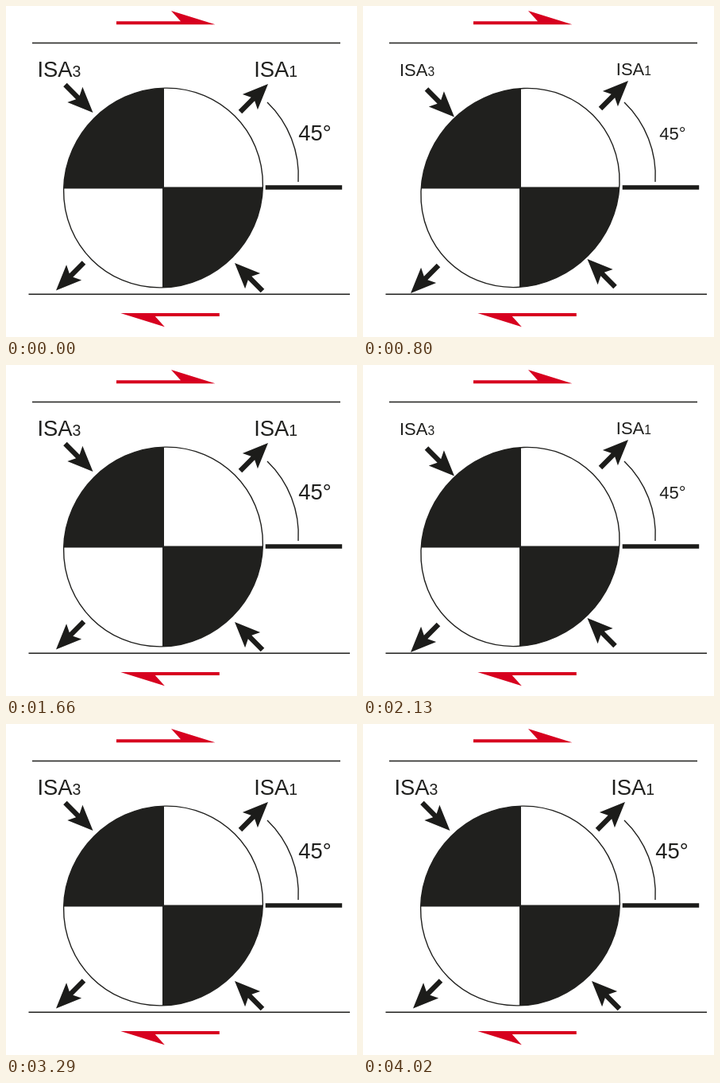
Write an HTML page that moves like this. It is 442 by 416 pixels and loops after 4080 ms.

```html
<!DOCTYPE html>
<html lang="en">
<head>
<meta charset="utf-8">
<title>Instantaneous stretching axes</title>
<style>
  html, body { margin: 0; width: 100%; height: 100%; overflow: hidden; background: #fff; }
  svg { display: block; }
  text { font-family: "Liberation Sans", Arial, sans-serif; fill: #20201e; }
  .line { fill: none; stroke: #20201e; stroke-width: 1.4; }
  .axis { stroke: #20201e; stroke-width: 2; }
</style>
</head>
<body>
<svg width="442" height="416" viewBox="0 0 442 416">
  <defs>
    <path id="shear" fill="#d7001f" d="M139 19.2H220L208 6L263.5 23.2H139Z"/>
    <path id="arrow" fill="#1c1c1a" d="M0 0L-32 13.5L-27 3.2H-49.5V-3.2H-27L-32 -13.5Z"/>
  </defs>
  <use href="#shear"/>
  <use href="#shear" transform="rotate(180 203.9 204.6)"/>
  <path class="line" d="M33 46.5H421M28.5 362.2H433"/>
  <path class="line" d="M329 121A128 128 0 0 1 368 221"/>
  <path d="M326.7 228H423.2" stroke="#1c1c1a" stroke-width="5.6"/>
  <g id="rest"></g>
  <g id="strained"></g>
</svg>
<script>
const LOOP = 4080;
const FLIPS = [130, 330, 470, 670, 800, 1000, 1130, 1330, 1460, 1660, 1800, 2000,
               2130, 2330, 2460, 2660, 2790, 2990, 3160, 3290, 3490, 3620, 3820, 4020];

const arrow = (x, y, angle) =>
  `<use href="#arrow" transform="translate(${x} ${y}) rotate(${angle})"/>`;

const label = (x, y, size, text, sub = '') =>
  `<text x="${x}" y="${y}" font-size="${size}">${text}<tspan font-size="${size * 0.71}">${sub}</tspan></text>`;

// Ellipse with its long axis a towards the upper right, two quadrants filled
function marker(a, b) {
  const cx = 198, cy = 228.5;
  const r = a * b * Math.SQRT2 / Math.hypot(a, b);
  const arc = `A${a} ${b} -45 0 1`;
  return `<ellipse class="line" rx="${a}" ry="${b}" transform="translate(${cx} ${cy}) rotate(-45)"/>
    <path class="axis" d="M${cx - r} ${cy}H${cx + r}M${cx} ${cy - r}V${cy + r}"/>
    <path fill="#20201e" d="M${cx} ${cy}H${cx - r}${arc} ${cx} ${cy - r}Z
      M${cx} ${cy}H${cx + r}${arc} ${cx} ${cy + r}Z"/>`;
}

const rest = document.getElementById('rest');
const strained = document.getElementById('strained');

rest.innerHTML = marker(127.5, 123.3) +
  arrow(109.5, 134, 45) + arrow(330, 98, -45) + arrow(63, 357.5, 135) + arrow(288, 323, -135) +
  label(39.4, 89, 27.4, 'ISA', 3) + label(312.2, 88.5, 27.4, 'ISA', 1) + label(368.3, 169, 27.4, '45°');

strained.innerHTML = marker(129.4, 120.6) +
  arrow(115, 139.5, 45) + arrow(334, 94, -45) + arrow(60, 361, 135) + arrow(282.5, 318, -135) +
  label(46, 88, 22, 'ISA', 3) + label(318.8, 87, 22, 'ISA', 1) + label(373.3, 167.5, 22, '45°');

function draw(now) {
  const t = now % LOOP;
  const isStrained = FLIPS.filter(flip => flip <= t).length % 2 === 1;
  rest.style.display = isStrained ? 'none' : '';
  strained.style.display = isStrained ? '' : 'none';
}

const start = performance.now();
function tick() {
  draw(performance.now() - start);
  requestAnimationFrame(tick);
}
tick();
</script>
</body>
</html>
```
